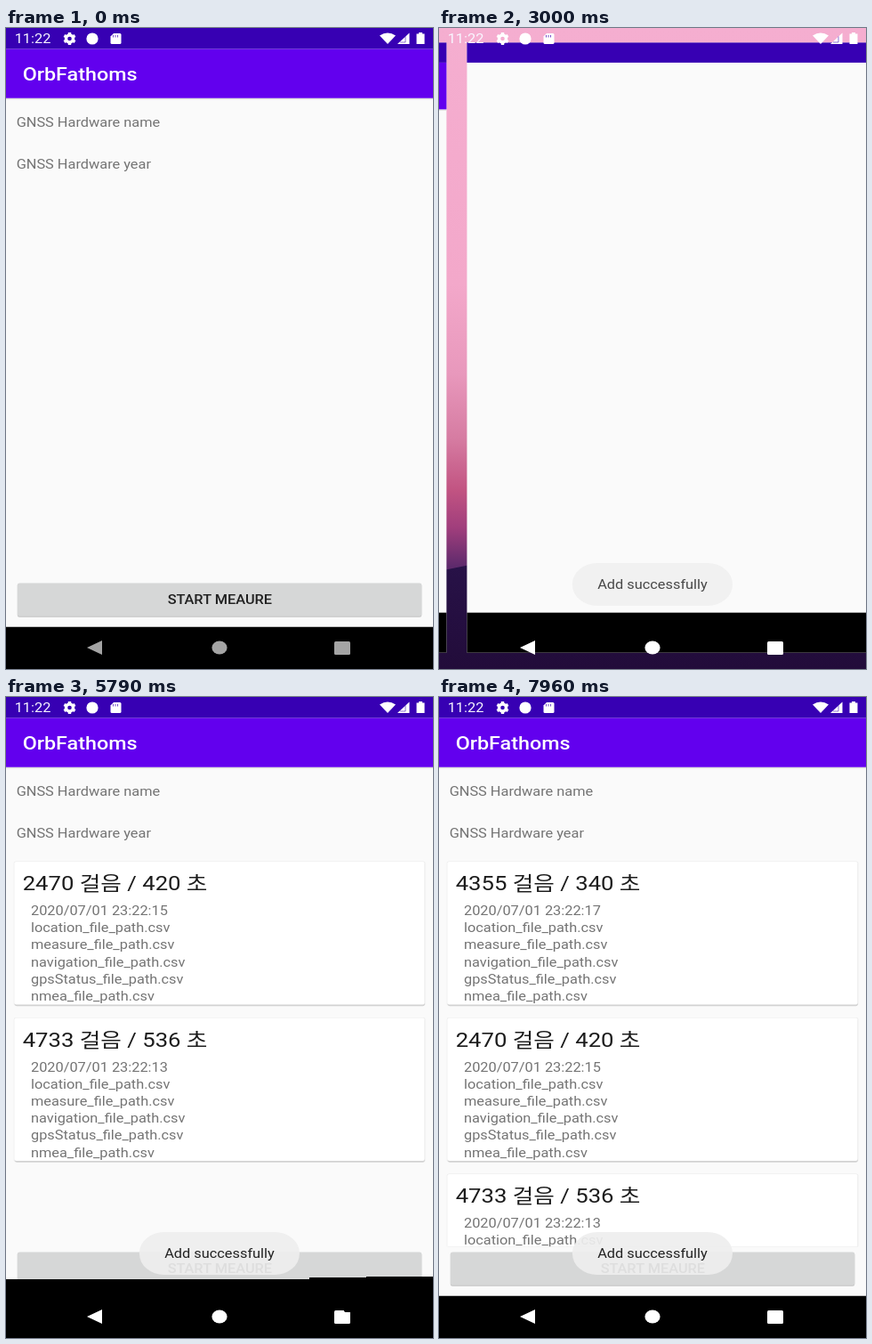
Animation of 480x720 px, one loop 8000 ms. Source, as an HTML page:

```html
<!DOCTYPE html>
<html lang="en">
<head>
<meta charset="utf-8">
<title>Screen recording</title>
<style>
html, body { margin: 0; width: 100%; height: 100%; overflow: hidden; background: #000; }
svg { display: block; width: 480px; height: 720px; }
text { font-family: Roboto, "Noto Sans CJK KR", "Noto Sans CJK", sans-serif; font-size: 14px; fill: #747474; }
.title { font-size: 20px; font-weight: 500; fill: #fff; }
.button { font-weight: 500; fill: #202020; text-anchor: middle; }
.steps { font-size: 22px; fill: #1c1c1c; }
.clock { fill: #f8f6ff; }
.toast { fill: #222; text-anchor: middle; }
</style>
</head>
<body>
<svg viewBox="0 0 480 720">
  <defs>
    <linearGradient id="sky" x1="0" y1="0" x2="0" y2="1">
      <stop offset="0" stop-color="#f5aed0"/>
      <stop offset=".4" stop-color="#f3a8ca"/>
      <stop offset=".54" stop-color="#e898bc"/>
      <stop offset=".64" stop-color="#d67ca2"/>
      <stop offset=".72" stop-color="#c25482"/>
      <stop offset=".78" stop-color="#a03e7c"/>
      <stop offset=".84" stop-color="#5e2a6c"/>
    </linearGradient>
    <linearGradient id="hill" x1="0" y1="0" x2="0" y2="1">
      <stop offset="0" stop-color="#281248"/>
      <stop offset="1" stop-color="#220c3a"/>
    </linearGradient>
    <clipPath id="list"><rect x="0" y="183" width="412" height="444"/></clipPath>
  </defs>

  <rect width="480" height="720" fill="url(#sky)"/>
  <path d="M0 610L40 602L170 603L195 608L300 600L420 600L480 612V720H0Z" fill="url(#hill)"/>

  <g id="blank"></g>
  <g id="main"></g>

  <path id="late" d="M0 654H341V652H405V651H480V674H0Z"/>

  <g id="nav">
    <path d="M108 688V704L91 696Z"/>
    <ellipse cx="240" cy="696" rx="8.6" ry="7.4"/>
    <rect x="369" y="689" width="18" height="15" rx="1.5"/>
  </g>
  <path id="notch" d="M379 688H388V691H381Z"/>

  <g fill="#fff">
    <g id="gear" transform="translate(71.5 12)">
      <circle r="4" fill="none" stroke="#fff" stroke-width="3.4"/>
    </g>
    <circle cx="97" cy="12" r="6.6"/>
    <path d="M121 6H128Q129.500 6 129.500 7.500V16.500Q129.500 18 128 18H119Q117.500 18 117.500 16.500V9.500Z"/>
    <path d="M420 8.500Q429 2.500 438 8.500L429 18Z"/>
    <path d="M453.500 5.500V18H440Z"/>
    <path d="M464 5H468V6.500H470.500V18H461.500V6.500H464Z"/>
  </g>
  <path d="M120.500 8V10.500M123 8V10.500M125.500 8V10.500" stroke="#3700b3" stroke-opacity=".7"/>
  <path d="M449 9.500V16H443" stroke="#3700b3" stroke-opacity=".7" stroke-width=".8" fill="none"/>
  <g id="front"></g>
</svg>
<script>
const NS = "http://www.w3.org/2000/svg";
const LOOP = 8000;
// The phone screen in dp, shown on a wider stage.
const W = 411.43, H = 731.43, SX = 480 / W, SY = 720 / H;
const OPENS = [2650, 5129, 7059];
const SLIDE = 400, BACK = 420, DONE = 630, SETTLED = 711;
const GAP = 23, SHRINK = .049;
const RECORDS = [["4733", "536", "13"], ["2470", "420", "15"], ["4355", "340", "17"]];
const FILES = ["location", "measure", "navigation", "gpsStatus", "nmea"];

const $ = id => document.getElementById(id);
const clamp = v => Math.max(0, Math.min(1, v));
const smooth = v => (v = clamp(v), v * v * (3 - 2 * v));
const show = (el, on) => el.setAttribute("visibility", on ? "visible" : "hidden");

function add(parent, tag, attrs = {}, content) {
  const el = document.createElementNS(NS, tag);
  for (const k in attrs) el.setAttribute(k, attrs[k]);
  if (content) el.textContent = content;
  parent.appendChild(el);
  return el;
}
const rect = (g, x, y, width, height, fill, rx = 0) =>
  add(g, "rect", { x, y, width, height, fill, rx });
const label = (g, x, y, cls, s) => add(g, "text", { x, y, class: cls }, s);
const screen = g => add(g, "g", { transform: `scale(${SX} ${SY})` });

function frame(g) {
  rect(g, 0, 0, W, H, "#fafafa");
  rect(g, 0, 0, W, 24, "#3700b3");
  rect(g, 0, 683.43, W, 48, "#000");
}

function card(g, [steps, secs, stamp]) {
  const c = add(g, "g");
  rect(c, 7.5, -0.5, 396.6, 164.6, "#ececec", 2);
  rect(c, 8.5, 1, 395, 163.8, "#d2d2d2", 2);
  rect(c, 8, 0, 395.4, 163, "#fff", 2);
  label(c, 16, 32.5, "steps", `${steps} 걸음 / ${secs} 초`);
  label(c, 24, 61, "", `2020/07/01 23:22:${stamp}`);
  FILES.forEach((f, i) => label(c, 24, 80.5 + 19.5 * i, "", f + "_file_path.csv"));
  return c;
}

const main = $("main"), blank = $("blank");
frame(screen(blank));

const app = screen(main);
frame(app);
rect(app, 0, 80, W, 1.5, "#dcdcdc");
rect(app, 0, 24, W, 56, "#6200ee");
label(app, 16, 59.7, "title", "OrbFathoms");
label(app, 10, 112.8, "", "GNSS Hardware name");
label(app, 10, 160.3, "", "GNSS Hardware year");
const list = add(app, "g", { "clip-path": "url(#list)" });
const cards = RECORDS.map(r => card(list, r));
rect(app, 11, 634.5, 389.5, 37.8, "#c2c2c2", 2);
rect(app, 11, 633.5, 389.5, 37.8, "#d6d7d7", 2);
label(app, 206, 657, "button", "START MEAURE");

for (let a = 0; a < 360; a += 60)
  add($("gear"), "rect", { x: -1.7, y: -7, width: 3.4, height: 3, transform: `rotate(${a})` });

const front = screen($("front"));
label(front, 8.3, 17.4, "clock", "11:22");
const toast = add(front, "g");
rect(toast, 128.5, 610.5, 154.3, 48.8, "#eee", 24).setAttribute("fill-opacity", .92);
label(toast, 205.7, 640.3, "toast", "Add successfully");

function place(el, dx, s) {
  el.setAttribute("transform", `translate(${240 + dx} ${360 - 20 * (1 - s)}) scale(${s}) translate(-240 -360)`);
}

function draw(t) {
  const k = OPENS.filter(a => t >= a).length - 1;
  const u = k < 0 ? Infinity : t - OPENS[k];
  const moving = u < DONE;

  let slide = 0, s = 1;
  if (u < BACK) {
    const p = clamp(u / SLIDE);
    slide = smooth(p);
    s = 1 - SHRINK * (1 - (1 - p) ** 2);
  } else if (moving) {
    slide = 1 - smooth((u - BACK) / (DONE - BACK));
    s = 1 - SHRINK * slide;
  }
  const dx = -slide * (480 * s + GAP);
  place(main, dx, s);
  place(blank, dx + 480 * s + GAP, s);
  show(blank, moving);

  const count = k < 0 ? 0 : u < BACK ? k : k + 1;
  cards.forEach((c, i) => {
    c.setAttribute("transform", `translate(0 ${188 + 178.3 * (count - 1 - i)})`);
    c.setAttribute("display", i < count ? "inline" : "none");
  });

  const alpha = Math.max(0, ...OPENS.map(a => {
    const v = t - a;
    return v < 0 ? 0 : Math.min(clamp((v + 60) / 500), clamp((2100 - v) / 200));
  }));
  toast.setAttribute("opacity", alpha);

  const grey = Math.round(164 + 91 * smooth((alpha - .3) / .5));
  $("nav").setAttribute("fill", `rgb(${grey},${grey},${grey})`);

  const late = u >= DONE && u < SETTLED;
  show($("late"), late);
  show($("notch"), late);
}

const start = performance.now();
function tick() {
  draw((performance.now() - start) % LOOP);
  requestAnimationFrame(tick);
}
tick();
</script>
</body>
</html>
```
